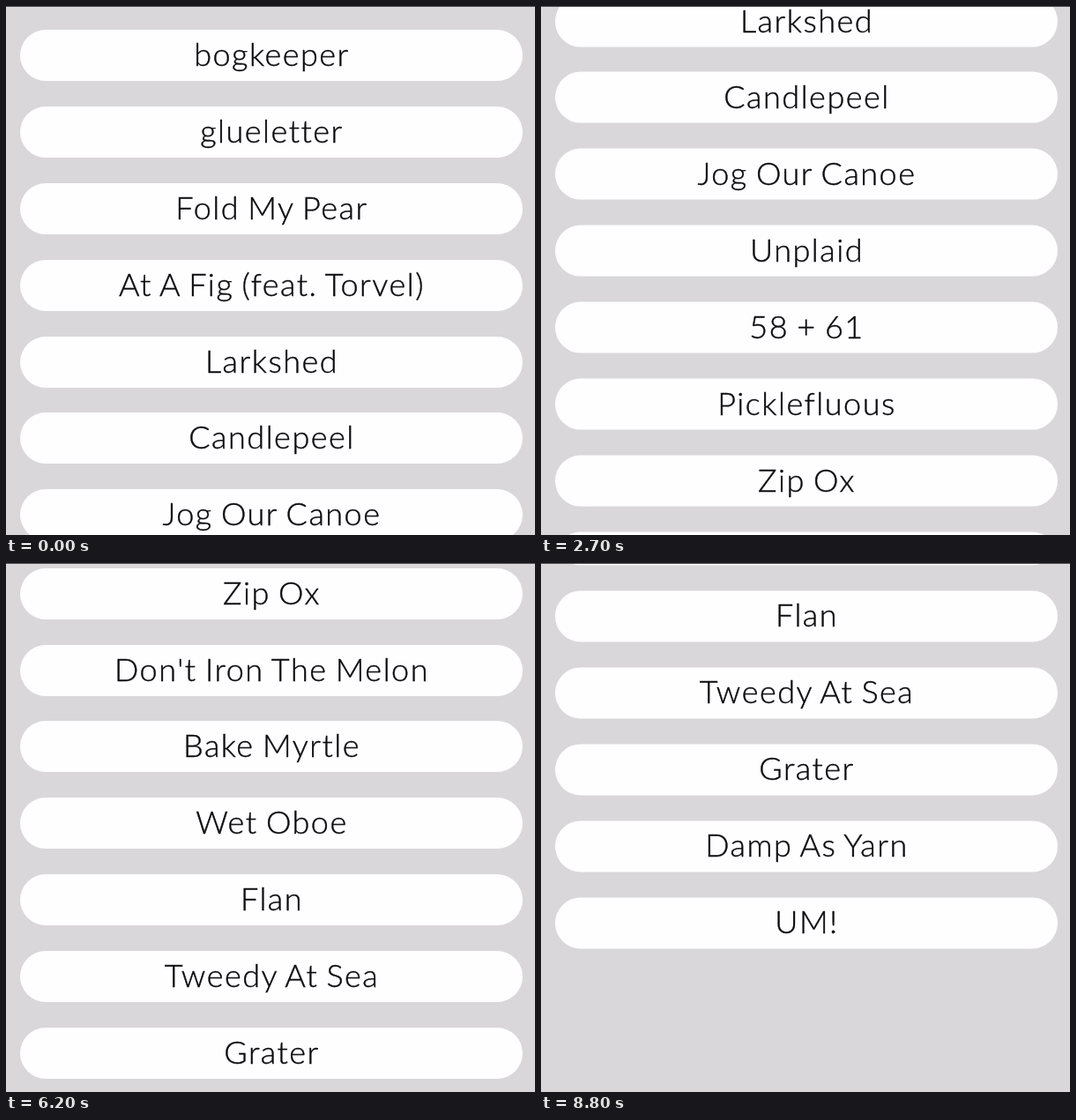
These frames come from a looping animation (600x600 px, 9.1 s). An HTML page:

```html
<!DOCTYPE html>
<html lang="en">
<head>
<meta charset="utf-8">
<title>Song list</title>
<style>
  html, body { margin: 0; width: 100%; height: 100%; overflow: hidden; background: #d9d7d9; }
  #stage { position: relative; width: 600px; height: 600px; overflow: hidden; }
  #stage::after { content: ""; position: absolute; inset: 0 0 auto; height: 1px; background: #4c4a4d; }
  #list { position: absolute; inset: 0; }
  .pill {
    position: absolute; left: 16px; width: 570px; height: 58px; border-radius: 29px;
    background: #fefdff; color: #0c0c0d; text-align: center; text-indent: 1px; white-space: pre;
    font: 300 36px/54px Lato, "Open Sans", sans-serif; letter-spacing: 1.5px; word-spacing: -2px;
    -webkit-text-stroke: 0.4px #0c0c0d;
  }
</style>
</head>
<body>
<div id="stage"><div id="list"></div></div>
<script>
const titles = [
  "bogkeeper", "glueletter", "Fold My Pear", "At A Fig (feat. Torvel)", "Larkshed",
  "Candlepeel", "Jog Our Canoe", "Unplaid", "58 + 61", "Picklefluous", "Zip Ox",
  "Don't Iron The Melon", "Bake Myrtle", "Wet Oboe", "Flan", "Tweedy At Sea",
  "Grater", "Damp As Yarn", "UM!"
];
const LOOP = 9100, STEP = 100, TOP = 27.2, PITCH = 86.85;

// [step, scroll offset, speed in px per step]
const path = [
  [3, 0, 10], [14, 157.9, 16.5], [27, 386.4, 16], [49, 700.5, 14.4],
  [62, 890, 14.4], [70, 1004.4, 14.2], [78, 1114.4, 12.8], [88, 1211.6, 5]
];

const list = document.getElementById("list");
titles.forEach((title, i) => {
  const pill = document.createElement("div");
  pill.className = "pill";
  pill.textContent = title;
  pill.style.top = TOP + i * PITCH + "px";
  list.append(pill);
});

// Cubic Hermite curve through the path points
function scrollAt(step) {
  const last = path[path.length - 1];
  if (step <= path[0][0]) return path[0][1];
  if (step >= last[0]) return last[1];
  const i = path.findIndex(p => p[0] > step);
  const [s0, y0, v0] = path[i - 1], [s1, y1, v1] = path[i];
  const d = s1 - s0, u = (step - s0) / d, w = 1 - u;
  return w * w * ((1 + 2 * u) * y0 + u * d * v0) + u * u * ((3 - 2 * u) * y1 - w * d * v1);
}

function draw(now) {
  let step = Math.floor((now % LOOP) / STEP);
  if (step > 31 && step < 39) step = 31; // the picture stalls, then catches up
  list.style.transform = `translateY(${-scrollAt(step).toFixed(2)}px)`;
}

const start = performance.now();
function tick() {
  draw(performance.now() - start);
  requestAnimationFrame(tick);
}
tick();
</script>
</body>
</html>
```
